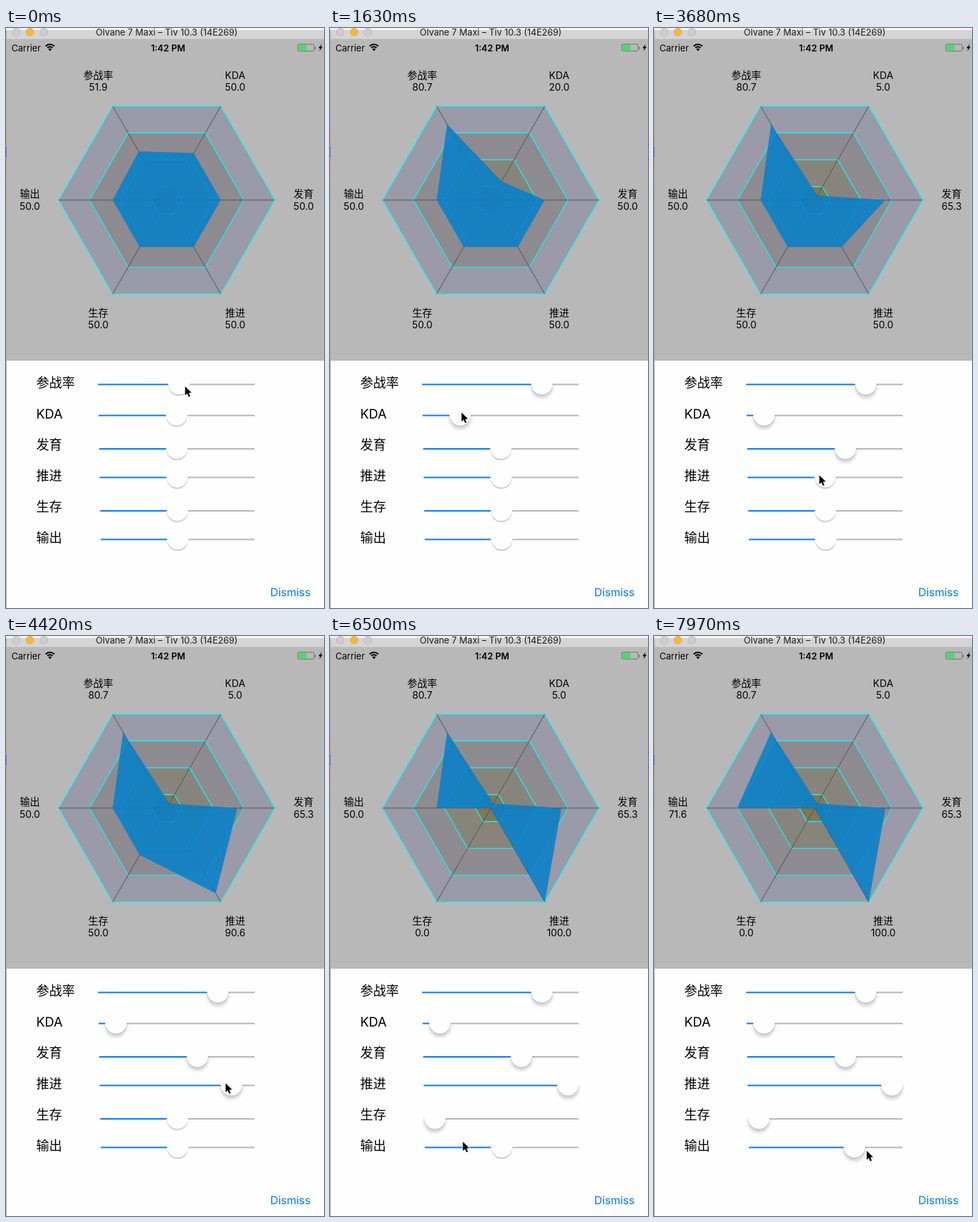
These frames come from a looping animation (463 by 842 pixels, 8000 ms). An HTML page with a canvas:

```html
<!DOCTYPE html>
<html lang="zh-CN">
<head>
<meta charset="utf-8">
<title>Radar chart</title>
<style>
html, body { margin: 0; width: 100%; height: 100%; overflow: hidden; background: #fefefe; }
canvas { display: block; width: 463px; height: 842px; }
</style>
</head>
<body>
<canvas id="stage" width="463" height="842"></canvas>
<script>
const ctx = document.getElementById('stage').getContext('2d');
const LOOP = 8000, STEP = 147.5, TRAVEL = 3;
const FONT = 'Inter, "Noto Sans CJK SC", "Noto Sans CJK", sans-serif';
const CX = 234, CY = 249.8, R = 157.5, LABEL_R = 199.3;
const RIGHT = 362, THUMB = 15.5;

// Each slider is dragged once, from begin to end (in steps); the hand may run past the track.
// grip: where the pointer holds the thumb, relative to its centre.
const rows = [
  { name: '参战率', from: 51.9, to: 80.7, begin: 0, end: 4, grip: [8, 2] },
  { name: 'KDA', from: 50, to: 5, begin: 7, end: 13, grip: [1, -5] },
  { name: '发育', from: 50, to: 65.3, begin: 17, end: 21, grip: [-10, 7] },
  { name: '推进', from: 50, to: 115, begin: 25, end: 33, grip: [-9.5, -4] },
  { name: '生存', from: 50, to: -26, begin: 38, end: 42, grip: [-3, 2] },
  { name: '输出', from: 50, to: 71.6, begin: 46, end: 54, grip: [17, 4] }
].map((row, i) => ({
  ...row,
  angle: i + 4,
  left: 134 + 0.8 * i,
  y: 517.5 + 45 * i + (i === 2 || i === 4 ? 3.5 : 0)
}));

const clamp = (v, lo, hi) => Math.min(hi, Math.max(lo, v));
const mix = (a, b, u) => a + (b - a) * u;
const easeOut = (u, power) => 1 - (1 - u) ** power;

const handValue = (row, k) =>
  mix(row.from, row.to, clamp((k - row.begin) / (row.end - row.begin), 0, 1));
const shownValue = (row, k) => clamp(handValue(row, k), 0, 100);
const thumbX = (row, v) => mix(row.left + THUMB, RIGHT - THUMB, v / 100);
const gripAt = (row, k) => [thumbX(row, handValue(row, k)) + row.grip[0], row.y + row.grip[1]];

// Follows the dragged thumb, rests, then moves on just before the next drag.
function pointerAt(k) {
  const i = rows.findLastIndex(row => k >= row.begin);
  const [x, y] = gripAt(rows[i], k), next = rows[i + 1];
  if (!next) return [x, y];
  const u = clamp((k - next.begin + TRAVEL) / TRAVEL, 0, 1);
  const [nx, ny] = gripAt(next, k);
  return [mix(x, nx, easeOut(u, 2)), mix(y, ny, easeOut(u, 3))];
}

function text(s, x, y, size, { color = '#000', align = 'left', weight = 400 } = {}) {
  ctx.font = `${weight} ${size}px ${FONT}`;
  ctx.fillStyle = color;
  ctx.textAlign = align;
  ctx.fillText(s, x, y);
}

function rect(x, y, w, h, color) {
  ctx.fillStyle = color;
  ctx.fillRect(x, y, w, h);
}

function disc(x, y, r, color) {
  ctx.fillStyle = color;
  ctx.beginPath();
  ctx.arc(x, y, r, 0, Math.PI * 2);
  ctx.fill();
}

function line(x1, y1, x2, y2, color, width) {
  ctx.strokeStyle = color;
  ctx.lineWidth = width;
  ctx.beginPath();
  ctx.moveTo(x1, y1);
  ctx.lineTo(x2, y2);
  ctx.stroke();
}

function poly(points) {
  ctx.beginPath();
  points.forEach(p => ctx.lineTo(p[0], p[1]));
  ctx.closePath();
}

function polar(r, sixth) {
  const a = sixth * Math.PI / 3;
  return [CX + r * Math.cos(a), CY + r * Math.sin(a)];
}

function windowBar() {
  rect(0, 0, 463, 3, '#f4f4f4');
  rect(0, 3, 463, 13, '#d4d4d4');
  ['#cdcdcd', '#fdb52f', '#cdcdcd'].forEach((color, i) => {
    disc(15 + 20 * i, 6, 6, '#b9b0a0');
    disc(15 + 20 * i, 6, 5.4, color);
  });
  text('Olvane 7 Maxi – Tiv 10.3 (14E269)', 234, 11.4, 13, { color: '#1c1c1c', align: 'center' });
}

function statusBar() {
  text('Carrier', 8, 33.5, 13);
  text('1:42 PM', 236, 33.5, 13, { align: 'center', weight: 600 });
  for (const r of [5.2, 8.8]) {
    ctx.beginPath();
    ctx.arc(64, 32.5, r, -Math.PI * 0.76, -Math.PI * 0.24);
    ctx.strokeStyle = '#000';
    ctx.lineWidth = 2;
    ctx.stroke();
  }
  ctx.fillStyle = '#000';
  poly([[64, 33.5], [61.5, 30.4], [64, 29.4], [66.5, 30.4]]);
  ctx.fill();
  ctx.strokeStyle = '#777';
  ctx.lineWidth = 1;
  ctx.beginPath();
  ctx.roundRect(424.5, 23.5, 24, 10, 2);
  ctx.stroke();
  rect(425.5, 24.5, 12, 8, '#4cd964');
  rect(449.5, 27, 1.5, 4, '#777');
  ctx.fillStyle = '#000';
  poly([[459.5, 23], [455, 29.3], [457.7, 29.3], [456, 34], [461, 27.3], [458.2, 27.3]]);
  ctx.fill();
}

function chart(values) {
  ['#9a9aa8', '#8e8b90', '#87857b', '#7f7859'].forEach((color, i) => {
    poly(rows.map(row => polar(R - 45 * i, row.angle)));
    ctx.fillStyle = color;
    ctx.fill();
    ctx.strokeStyle = '#0ff';
    ctx.lineWidth = 1.2;
    ctx.stroke();
  });
  rows.forEach(row => line(CX, CY, ...polar(R, row.angle), '#505050', 1));
  poly(rows.map((row, i) => polar(R * values[i] / 100, row.angle)));
  ctx.fillStyle = 'rgba(8,128,202,.87)';
  ctx.fill();
  rows.forEach((row, i) => {
    const [x, y] = polar(LABEL_R, row.angle);
    text(row.name, x, y - 3.4, 14.5, { align: 'center' });
    text(values[i].toFixed(1), x, y + 14, 14.2, { align: 'center' });
  });
}

function slider(row, v, i) {
  const x = thumbX(row, v), y = row.y;
  text(row.name, 44, 522 + 45 * i, 18.8);
  line(row.left, y, x, y, '#007aff', 2);
  line(x, y, RIGHT, y, '#b6b6b6', 2);
  ctx.save();
  if (v !== row.from) {
    ctx.shadowColor = 'rgba(0,0,0,.2)';
    ctx.shadowBlur = 5;
    ctx.shadowOffsetY = 3;
  }
  disc(x, y + 1, THUMB, '#cbcbcb');
  ctx.restore();
  disc(x, y - 1, THUMB, '#fefefe');
  rect(x - THUMB - 1, y - 17, 2 * THUMB + 2, 16, '#fefefe');
}

function arrow(x, y) {
  poly([[0, 0], [0, 13.2], [3, 10.4], [5.2, 15.2], [7.4, 14.2], [5.3, 9.5], [9.4, 9.3]]
    .map(p => [x + 1 + p[0], y + 0.7 + p[1]]));
  ctx.strokeStyle = '#fff';
  ctx.lineWidth = 1.6;
  ctx.stroke();
  ctx.fillStyle = '#000';
  ctx.fill();
}

function leftEdge() {
  const gold = '#d0a03c', blue = '#2f86d8', grey = '#aaa';
  rect(0, 3, 1, 839, grey);
  [gold, blue, gold, grey, gold].forEach((color, i) => rect(0, 152 + 20.5 * i, 1, 15, color));
}

function draw(k) {
  const values = rows.map(row => shownValue(row, k));
  rect(0, 0, 463, 842, '#fefefe');
  rect(0, 15, 463, 468, '#b8b8b8');
  windowBar();
  statusBar();
  chart(values);
  rows.forEach((row, i) => slider(row, values[i], i));
  text('Dismiss', 443.5, 825, 16, { color: '#007aff', align: 'right' });
  leftEdge();
  arrow(...pointerAt(k));
}

const start = performance.now();
function tick() {
  const t = (performance.now() - start) % LOOP;
  draw(Math.min(54, Math.floor((t + 10) / STEP)));
  requestAnimationFrame(tick);
}
tick();
</script>
</body>
</html>
```
